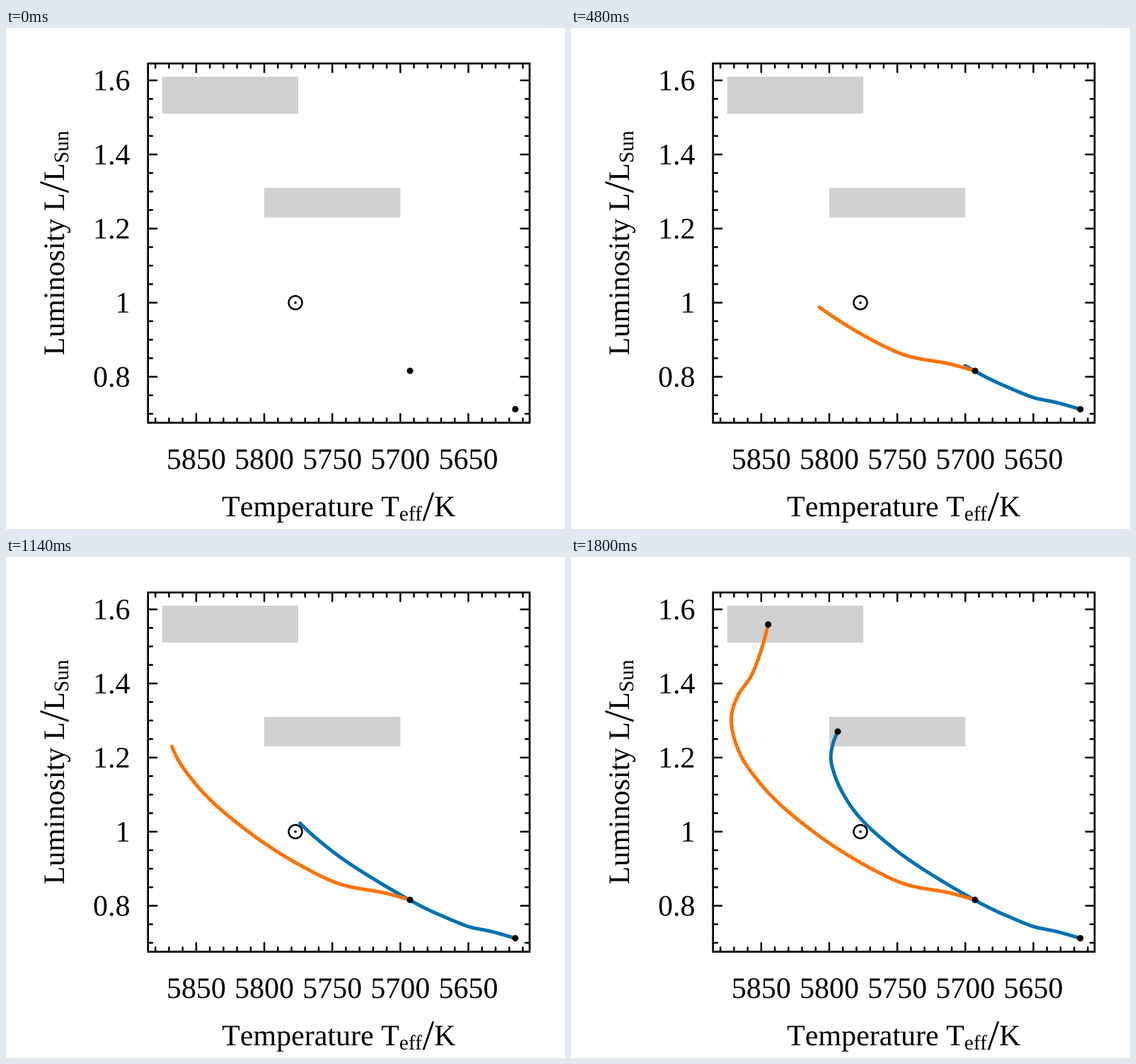
Animation, 790 px wide and 709 px high, one loop 3860 ms. Source, as a matplotlib script:

```python
import numpy as np
import matplotlib.pyplot as plt
from matplotlib.animation import FuncAnimation
from matplotlib.collections import LineCollection
from matplotlib.patches import Circle, PathPatch, Rectangle
from matplotlib.textpath import TextPath
from matplotlib.transforms import Affine2D

W, H, DPI = 790, 709, 64
TICK_MS, LOOP_MS = 20, 3860
STEP_MS, LAST_STEP = 60, 30
EM, SUB, SLASH = 42, 29.4, 60
L, R, T, B = 200.7, 740, 50.2, 558.6

plt.rcParams["font.family"] = "Liberation Serif"

fig = plt.figure(figsize=(W / DPI, H / DPI), dpi=DPI)
ax = fig.add_axes([0, 0, 1, 1])
ax.set(xlim=(0, W), ylim=(H, 0))
ax.axis("off")


def pt(px):
    return px * 72 / DPI


def px_x(temp):
    return 365 + (5800 - temp) * 1.923


def px_y(lum):
    return 388.7 + (1 - lum) * 524.3


def label(x, y, text, size=EM, angle=0):
    place = Affine2D().scale(1, -1).rotate_deg(-angle).translate(x, y)
    glyphs = TextPath((0, 0), text, size=size).transformed(place)
    ax.add_patch(PathPatch(glyphs, fc="black", ec="none", lw=0))


def dot(x, y, r=4.5):
    return ax.add_patch(Circle((x, y), r, fc="black", ec="none", zorder=5))


def smooth(t, points, at):
    """Cubic Hermite curve through points reached at the times t."""
    slope = np.gradient(points, t, axis=0, edge_order=2)
    i = np.clip(np.searchsorted(t, at, side="right") - 1, 0, len(t) - 2)
    h = (t[i + 1] - t[i])[:, None]
    u = (at - t[i])[:, None] / h
    return ((1 + 2 * u) * (1 - u) ** 2 * points[i]
            + u * (1 - u) ** 2 * h * slope[i]
            + u * u * (3 - 2 * u) * points[i + 1]
            + u * u * (u - 1) * h * slope[i + 1])


class Track:
    """A growing line through keys of (step, x, y)."""

    def __init__(self, keys, color, grey, zorder):
        keys = np.array(keys, float)
        self.t, self.points = keys[:, 0], keys[:, 1:]
        self.color, self.grey = color, grey
        self.line, = ax.plot([], [], lw=pt(5), zorder=zorder,
                             solid_capstyle="round", solid_joinstyle="round")
        dot(*self.points[0])
        self.end = dot(*self.points[-1])

    def show(self, step, flash):
        at = np.linspace(self.t[0], step, 300)
        self.line.set_data(*smooth(self.t, self.points, at).T)
        self.line.set_visible(step > 0)
        self.line.set_color(self.grey if flash else self.color)
        self.end.set_visible(step == LAST_STEP)


# Target zones
zones = []
for hot, high, depth in [(5875, 1.61, 0.10), (5800, 1.31, 0.08)]:
    x, y = px_x(hot), px_y(high)
    zones.append(ax.add_patch(Rectangle(
        (x, y), px_x(hot - 100) - x, px_y(high - depth) - y,
        ec="none", lw=0, zorder=1, snap=False)))

# Frame and ticks
ax.add_patch(Rectangle((L, T), R - L, B - T, fill=False, ec="black",
                       lw=pt(2.7), zorder=6, snap=False))
ticks = []
for temp in range(5610, 5881, 10):
    x, n = px_x(temp), 12.5 if temp % 50 == 0 else 6.2
    ticks += [[(x, T), (x, T + n)], [(x, B), (x, B - n)]]
for k in range(14, 33):
    y, n = px_y(k / 20), 12.5 if k % 4 == 0 else 6.2
    ticks += [[(L, y), (L + n, y)], [(R, y), (R - n, y)]]
ax.add_collection(LineCollection(ticks, colors="black", lw=pt(2.5),
                                 capstyle="round", zorder=6, snap=False))

# Numbers and titles
for temp in range(5650, 5851, 50):
    label(px_x(temp) - EM, 624, str(temp))
for lum in (0.8, 1, 1.2, 1.4, 1.6):
    text = f"{lum:g}"
    width = EM * (1.25 if "." in text else 0.5)
    label(175.5 - width, px_y(lum) + 14, text)

for x, text in [(305.1, "T"), (330.8, "emperature"), (530.2, "T"), (605.1, "K")]:
    label(x, 691, text)
label(555.8, 697, "eff", SUB)
label(588.5, 697, "/", SLASH)

for y, text in [(463.4, "Luminosity"), (259.2, "L"), (216.8, "L")]:
    label(82, y, text, angle=90)
label(88, 191.1, "Sun", SUB, 90)
label(88, 233.5, "/", SLASH, 90)

# Sun symbol
ax.add_patch(Circle((409, 388.7), 9.5, fill=False, ec="black", lw=pt(2.5),
                    zorder=5))
dot(409, 388.7, 1.8)

# Keys before step 0 shape the part that is there from the first step on
tracks = [
    Track([(-4.5, 719.8, 539.5), (-2.8, 690, 531), (0.3, 650, 521.8),
           (2, 623, 510.8), (8, 557, 477.8), (15, 458, 414), (22, 391, 346),
           (25, 373.5, 311), (27.5, 367.3, 281), (30, 377, 247)],
          "#0071b2", "#393939", 2),
    Track([(-9, 571, 485.2), (-6.5, 541, 476.8), (-0.3, 462, 459.3),
           (2, 432, 445), (8, 351, 395), (15, 267, 320), (18, 240.5, 282),
           (22, 226.7, 226), (24.5, 236, 196), (27, 257, 163.5),
           (30, 278.7, 95.5)],
          "#fd7200", "#1f1f1f", 3),
]


def draw(i):
    step = min(i * TICK_MS // STEP_MS, LAST_STEP)
    flash = step == 1
    fig.set_facecolor("#939393" if flash else "white")
    for zone in zones:
        zone.set_facecolor("#777777" if flash else "#d0d0d0")
    for track in tracks:
        track.show(step, flash)
    return []


anim = FuncAnimation(fig, draw, frames=LOOP_MS // TICK_MS, interval=TICK_MS,
                     init_func=lambda: draw(0), repeat=True, repeat_delay=0)
plt.show()
```
